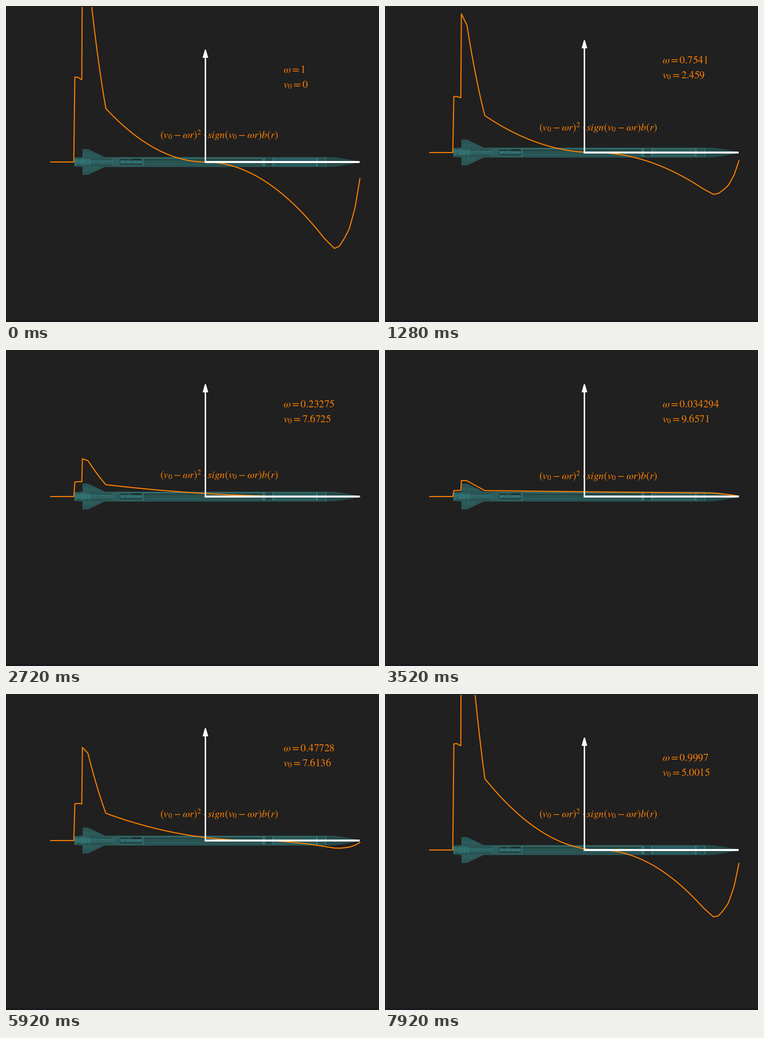
These frames come from a looping animation (751x634 px, 8000 ms). A matplotlib script:

```python
import numpy as np
import matplotlib.pyplot as plt
from matplotlib.animation import FuncAnimation
from matplotlib.patches import Polygon, Rectangle
from matplotlib.transforms import Affine2D

W, H, DPI = 751, 634, 100
FRAMES, INTERVAL = 100, 80
ORANGE, BACK = "#ff8000", "#202020"
CENTER, UNIT = 401.4, 6.222      # pixel of r = 0, pixels per unit of r
LOW, HIGH, HEADROOM = 313, 294, 292

plt.rcParams["mathtext.fontset"] = "stix"
fig = plt.figure(figsize=(W / DPI, H / DPI), dpi=DPI, facecolor=BACK)
ax = fig.add_axes([0, 0, 1, 1])
ax.set(xlim=(0, W), ylim=(H, 0))
ax.axis("off")

# Everything is drawn relative to the rocket's axis, which sits at one of two heights.
lift = Affine2D()
moving = lift + ax.transData


def px(width):
    return width * 72 / DPI


def shape(points, color, z=1.0, alpha=1.0):
    ax.add_patch(Polygon(points, closed=True, fc=color, lw=0, alpha=alpha,
                         zorder=z, transform=moving))


def box(x0, y0, x1, y1, color, z=1.2, alpha=1.0):
    shape([(x0, y0), (x1, y0), (x1, y1), (x0, y1)], color, z, alpha)


def label(x, y):
    return ax.text(x, y, "", color=ORANGE, fontsize=px(21), va="baseline",
                   transform=moving, zorder=4)


# Half width of the rocket along its length, as (pixel, width) knots
KNOTS = np.array([
    (90, 0), (136.5, 0), (138.6, .0955), (145, .100), (150, .102), (152.6, .1035),
    (153.8, .264), (165, .264), (201, .1035), (640, .1035), (661, .0995),
    (671, .090), (691, .0619), (703, .0383), (712.5, .0133)])
xs = np.union1d(np.linspace(90, 712.5, 500), KNOTS[:, 0])
breadth = np.interp(xs, *KNOTS.T)
radius = (xs - CENTER) / UNIT


def draw_rocket():
    for side in (-1, 1):
        shape([(154, side * 9), (154, side * 26), (165, side * 26), (201, side * 9)],
              "#2b5454")
        shape([(154, side * 9), (154, side * 18), (176, side * 18), (196, side * 9)],
              "#2d5a5a", 1.05)
    shape([(137, -9), (152, -10), (645, -10), (661, -9.5), (680, -7), (712, -1),
           (712, 1), (680, 7), (661, 9.5), (645, 10), (152, 10), (137, 9)],
          "#274a4a", 1.1)
    box(138, -9, 645, 8, "#2a5656", alpha=.8)
    for y in (-9.5, 8.5):
        box(152, y, 645, y + 1, "#33696a", alpha=.7)

    # Tail
    box(138, -6, 170, 5, "#2f6b6b")
    box(170, -4, 215, 4, "#2e6262")
    for x in (140, 151, 155, 159, 168):
        box(x, -8, x + 1.2, 8, "#3a8484", alpha=.7)
    box(138, -2, 215, -1, "#388080", alpha=.6)

    # Coupler and the open bay
    for x in range(215, 228, 3):
        box(x, -8, x + 1.4, 8, "#357676")
    box(227, -8, 276, 8, "#37797a")
    box(228, -7, 275, 7, "#264a4a")
    box(230, -3, 273, 3, "#2f6868")
    box(253, -7, 272, -3, "#202f30")
    box(231, -6, 246, -4, "#223a3a")
    box(236, 3, 268, 5, "#244040")
    for x in (233, 244, 256, 264, 270):
        box(x, -2, x + 4, 1, "#3a8282", alpha=.7)

    # Long tube
    box(276, -8, 520, -7, "#3a7c7c")
    box(276, -6, 518, -3, "#244343", alpha=.8)
    box(276, 4, 518, 5, "#316666", alpha=.7)
    box(275, -8, 277, 8, "#357474")

    # Forward sections
    box(516, -8, 522, 8, "#337070")
    box(522, -7, 536, 7, "#264b4b")
    box(536, -8, 627, 8, "#2d6060")
    box(540, -5, 624, 5, "#2b5858")
    for x, color in ((537, "#357575"), (625, "#3c8686"), (643, "#336c6c")):
        box(x, -8, x + 1.8, 8, color)


draw_rocket()

ax.add_patch(Rectangle((0, 630), W, 4, fc="#1c181e", lw=0))
window = Rectangle((0, 2), W, H - 4, transform=ax.transData)
curve, = ax.plot([], [], color=ORANGE, lw=px(2.1), zorder=2, transform=moving,
                 solid_joinstyle="round")
curve.set_clip_path(window)

box(400, -212, 403, 2, "white", 5)
box(400, -2, 712, 2, "white", 5)
shape([(400.4, -225.5), (402.6, -225.5), (407.2, -209), (395.8, -209)], "white", 5)

omega_text = label(558.5, -179)
speed_text = label(558.5, -149)
formula = label(309.5, 0)
formula.set_text(r"$(v_0-\omega r)^2\cdot sign(v_0-\omega r)b(r)$")


def state(frame):
    """Rotation rate and speed: slow to a stop, then spin up while losing half the speed."""
    half = FRAMES // 2
    u = 2 * (frame % half) / (FRAMES - 1)
    ease = u * u * (3 - 2 * u)
    if frame < half:
        return 1 - ease, 10 * ease
    return ease, 10 - 5 * ease


def signed_square(v):
    return v * np.abs(v)


def update(frame):
    omega, speed = state(frame)
    force = signed_square(speed - omega * radius) * breadth
    lift.clear().translate(0, LOW if force.max() > HEADROOM else HIGH)
    curve.set_data(xs, -force)
    formula.set_y(-23.7 - .1035 * signed_square(speed + 15 * omega))
    omega_text.set_text(rf"$\omega = {omega:.5g}$")
    speed_text.set_text(rf"$v_0 = {speed:.5g}$")
    return curve, formula, omega_text, speed_text


anim = FuncAnimation(fig, update, frames=FRAMES, interval=INTERVAL,
                     repeat=True, repeat_delay=0, blit=False)
plt.show()
```
